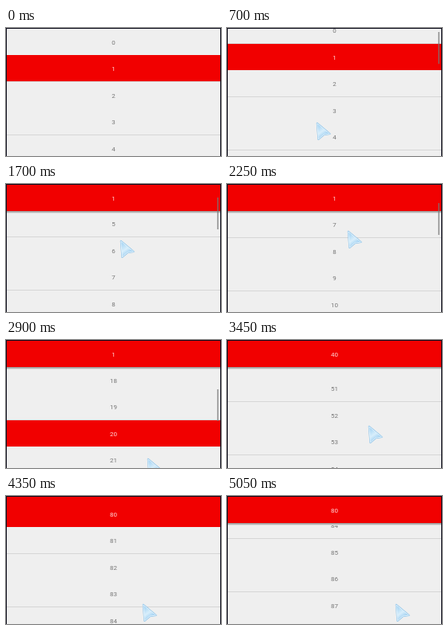
An HTML page with a canvas for the animation above (5.1 s loop, 269 by 161 pixels).

```html
<!DOCTYPE html>
<html lang="en">
<head>
<meta charset="utf-8">
<title>Pinned section list</title>
<style>
  html, body { margin: 0; width: 100%; height: 100%; overflow: hidden; background: #efefef; }
  canvas { display: block; }
</style>
</head>
<body>
<canvas id="stage" width="269" height="161"></canvas>
<script>
const W = 269, H = 161, LOOP = 5100, STEP = 50;
const ROW = 33.5, TOP = 1;
const RED = '#f10000', PAPER = '#efefef';
const ctx = document.getElementById('stage').getContext('2d');

// [ms, scroll offset] up to the last flick
const SCROLL = [
  [600, 0], [1000, 57], [1350, 57], [1650, 135], [1950, 135], [2200, 183],
  [2250, 201], [2300, 235], [2400, 310], [2500, 378], [2600, 436],
  [2700, 486], [2800, 528], [2900, 570], [2950, 588], [3000, 632], [3050, 765], [3100, 906]
];
// [ms, x, y] of the pointer tip
const POINTER = [
  [50, 166, 92], [300, 130, 116], [550, 109, 133], [600, 110, 133], [1000, 118, 76],
  [1100, 116, 80], [1200, 132, 104], [1350, 135, 138], [1650, 141, 60],
  [1950, 150, 125], [2200, 151, 77], [2250, 151, 59], [2350, 155, 36],
  [2900, 177, 149], [3050, 172, 60], [3450, 177, 108], [4350, 171, 136],
  [4900, 174, 136], [4950, 174, 136], [5050, 211, 136]
];

function along(table, t, col) {
  if (t <= table[0][0]) return table[0][col];
  for (let i = 1; i < table.length; i++) {
    const a = table[i - 1], b = table[i];
    if (t <= b[0]) return a[col] + (b[col] - a[col]) * (t - a[0]) / (b[0] - a[0]);
  }
  return table[table.length - 1][col];
}

function scrollAt(t) {
  const left = Math.max(0, 4950 - t);
  const s = t < 3100 ? along(SCROLL, t, 1) : 2794.5 - 1129.5 * Math.pow(left / 1500, 2.45);
  return Math.round(s * 2) / 2;
}

const isHeader = n => n === 1 || (n > 0 && n % 20 === 0);

function box(color, x, y, w, h) {
  ctx.fillStyle = color;
  ctx.fillRect(x, y, w, h);
}

function drawRow(n, top) {
  const red = isHeader(n);
  const y = Math.floor(top);
  if (red) box(RED, 1, y, W - 2, Math.floor(top + ROW) - y);
  ctx.fillStyle = red ? '#ffd9d9' : '#777';
  ctx.fillText(n, 134.5, Math.floor(top + 17) + 3);
}

function drawList(s) {
  const first = Math.max(0, Math.floor(s / ROW));
  for (let n = first; n < first + 7; n++) drawRow(n, TOP + n * ROW - s);
  // hairlines show only where they land on a whole pixel
  for (let n = first + 1; n < first + 7; n++) {
    const y = TOP + n * ROW - s;
    if (Number.isInteger(y)) box('#d6d6d6', 1, y - 1, W - 2, 1);
  }
}

function drawPinned(s) {
  let head = Math.floor(s / ROW);
  while (head > 0 && !isHeader(head)) head--;
  if (!head) return;
  let next = head + 1;
  while (!isHeader(next)) next++;
  const shift = Math.min(0, next * ROW - s - ROW);
  drawRow(head, TOP + shift);
  if (shift === 0) {
    ['#a3a0a0', '#b4b4b4', '#dcdcdc'].forEach((c, i) => box(c, 1, 34 + i, W - 2, 1));
  }
}

function drawPointer(x, y) {
  ctx.save();
  ctx.translate(Math.round(x), Math.round(y));
  const fill = ctx.createLinearGradient(2, 4, 12, 18);
  fill.addColorStop(0, '#a9d6f4');
  fill.addColorStop(0.5, '#d8eefb');
  fill.addColorStop(1, '#8ec6ee');
  ctx.beginPath();
  [[0.8, 0.8], [16.6, 14], [9, 15.2], [2.4, 21]].forEach(p => ctx.lineTo(p[0], p[1]));
  ctx.closePath();
  ctx.lineJoin = 'round';
  ctx.strokeStyle = '#86bfe6';
  ctx.lineWidth = 2;
  ctx.stroke();
  ctx.fillStyle = fill;
  ctx.fill();
  ctx.strokeStyle = '#f2faff';
  ctx.lineWidth = 0.8;
  ctx.stroke();
  ctx.restore();
}

function draw(t) {
  const s = scrollAt(t);
  box(PAPER, 0, 0, W, H);
  ctx.font = '8px Roboto, sans-serif';
  ctx.textAlign = 'center';
  drawList(s);
  drawPinned(s);
  if (s > 0) box('rgba(120,120,120,0.6)', 264, Math.round(3 + s * 0.104), 2, 40);
  box('#0c0c1c', 0, 0, W, 1);
  box('#0c0c1c', 0, 0, 1, H);
  box('#0c0c1c', W - 1, 0, 1, H);
  if (t >= POINTER[0][0]) drawPointer(along(POINTER, t, 1), along(POINTER, t, 2));
}

const start = performance.now();
function tick() {
  const t = (performance.now() - start) % LOOP;
  draw(Math.floor(t / STEP) * STEP);
  requestAnimationFrame(tick);
}
tick();
</script>
</body>
</html>
```
